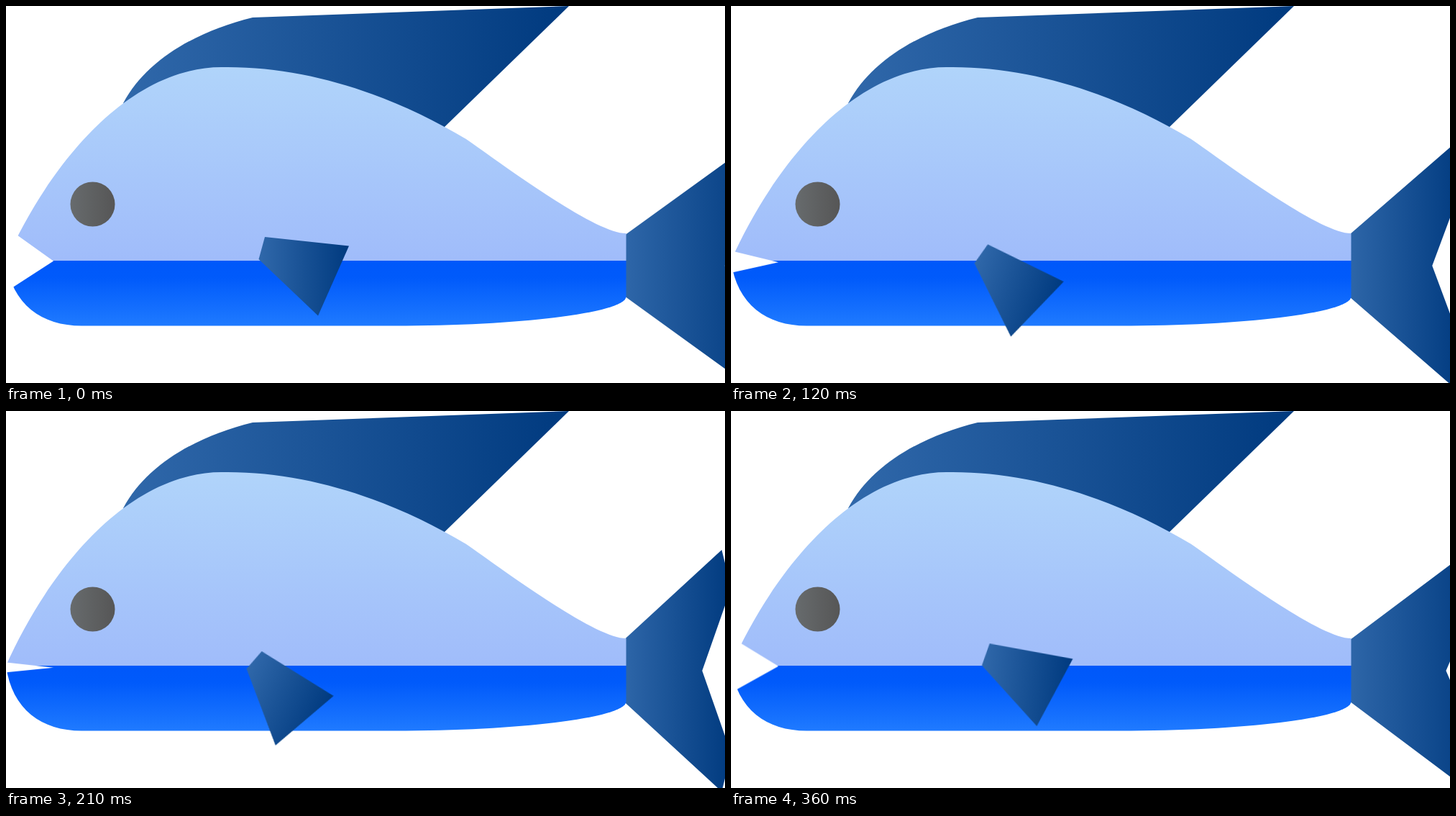
Write an HTML page that moves like this. It is 1000 px wide and 524 px high and loops after 0.39 s.

```html
<!DOCTYPE html>
<html lang="en">
<head>
<meta charset="utf-8">
<title>Swimming fish</title>
<style>
  html, body { margin: 0; width: 100%; height: 100%; overflow: hidden; background: #fff; }
  svg { display: block; width: 1000px; height: 524px; }

  /* Thirteen poses of 30 ms: six steps out, seven steps back. */
  .tail, .fin, .mouth { animation: 390ms infinite; }
  .tail  { transform-origin: 853px 361px; animation-name: squeeze; }
  .fin   { transform-origin: 329.3px 318px; animation-name: flap; }
  .mouth { transform-origin: 0 357px; animation-name: bite; }

  @keyframes squeeze {
    0% { transform: scaleX(1); animation-timing-function: steps(6); }
    46.1538% { transform: scaleX(.75); animation-timing-function: steps(7); }
    100% { transform: scaleX(1); }
  }
  @keyframes flap {
    0% { transform: rotate(0deg); animation-timing-function: steps(6); }
    46.1538% { transform: rotate(30deg); animation-timing-function: steps(7); }
    100% { transform: rotate(0deg); }
  }
  @keyframes bite {
    0% { transform: scaleY(1); animation-timing-function: steps(6); }
    46.1538% { transform: scaleY(.012); animation-timing-function: steps(7); }
    100% { transform: scaleY(1); }
  }
</style>
</head>
<body>
<svg viewBox="0 0 1000 524">
  <defs>
    <linearGradient id="navy">
      <stop offset="0" stop-color="#3068aa"/>
      <stop offset="1" stop-color="#003a7f"/>
    </linearGradient>
    <linearGradient id="back" x2="0" y2="1">
      <stop offset="0" stop-color="#b0d4fa"/>
      <stop offset="1" stop-color="#a0bcfa"/>
    </linearGradient>
    <linearGradient id="belly" x2="0" y2="1">
      <stop offset="0" stop-color="#0058fa"/>
      <stop offset=".25" stop-color="#005afb"/>
      <stop offset="1" stop-color="#1f7aff"/>
    </linearGradient>
    <linearGradient id="iris">
      <stop offset="0" stop-color="#676b6d"/>
      <stop offset="1" stop-color="#565656"/>
    </linearGradient>
  </defs>

  <path class="tail" fill="url(#navy)"
        d="M853 324 L1034.3 193 L1051 246 L999.7 361 L1051 476 L1034.3 529 L853 398Z"/>
  <path fill="url(#navy)"
        d="M163 135 C195 75 265 35 343 16 L783 0 L610 168 L500 190 L200 190Z"/>
  <path fill="url(#back)"
        d="M0 354 C60 220 170 85 300 85 C420 83 540 125 640 185 C700 227 820 316 862.5 316 V354Z"/>
  <path fill="url(#belly)"
        d="M0 354 H862.5 V404 C862 426 718 444.5 540 444.5 H105 C50 444.5 8 415 0 354Z"/>
  <path class="mouth" fill="#fff" d="M66 354.5 L-4 304.5 V399.7Z"/>
  <circle cx="120.5" cy="275.5" r="31" fill="url(#iris)"/>
  <path class="fin" fill="url(#navy)" d="M360 321 L477 333.5 L434 430.5 L351.5 352Z"/>
</svg>
</body>
</html>
```
